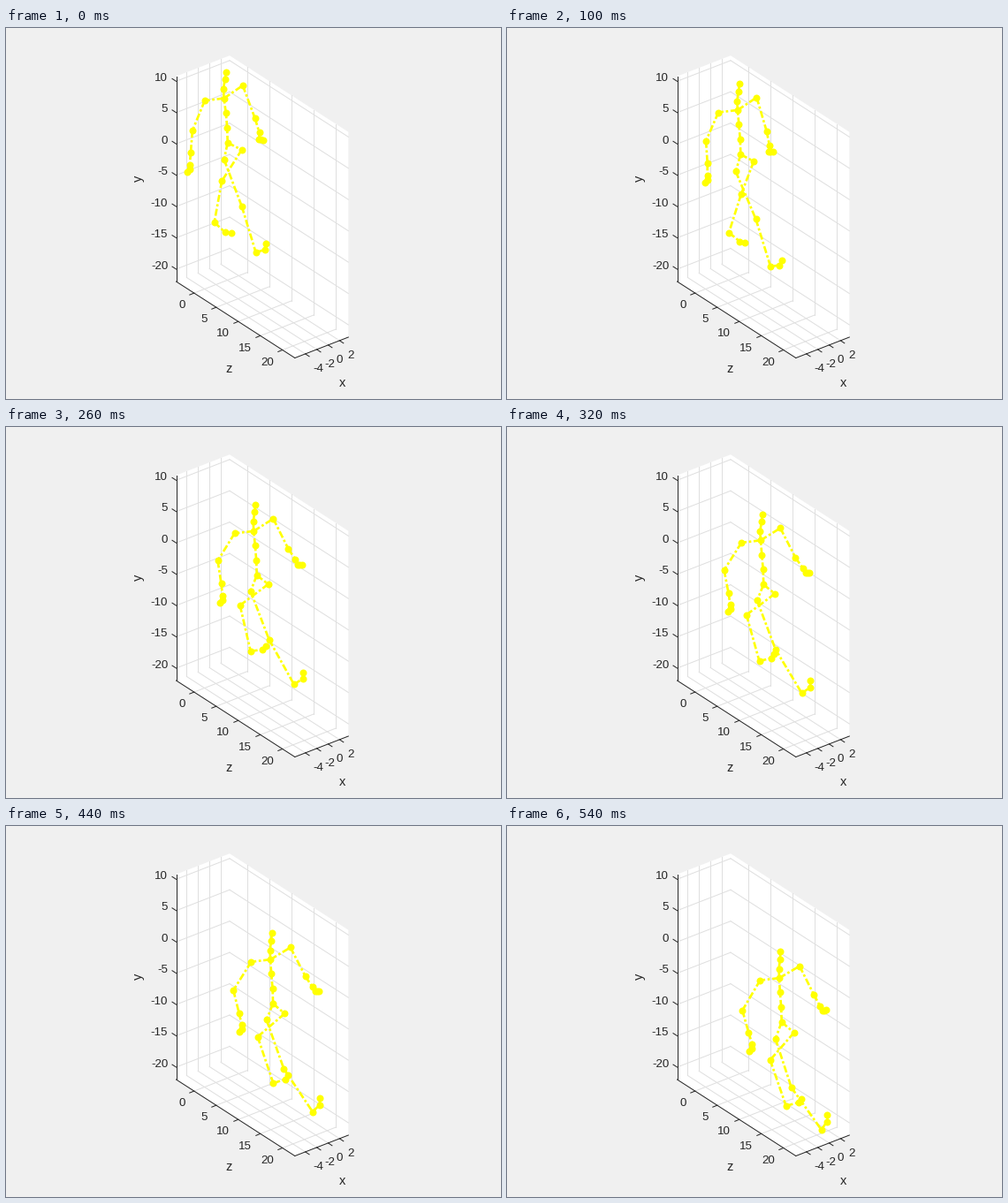
A matplotlib script that plays this animation: 560 px wide and 420 px high, repeating every 0.56 s.

```python
import numpy as np
import matplotlib.pyplot as plt
from matplotlib.animation import FuncAnimation
from matplotlib.collections import LineCollection

W, H, DPI = 560, 420, 100
PX = 72 / DPI                       # points per pixel
STEP, FRAMES = 20, 28
MID, END = 260, 540                 # ms
INK, YELLOW, BACK = "#262626", "#ffff00", "#f0f0f0"


def path(t, start, mid=None, end=None):
    """Hold, straight drift or parabola, for one, two or three key points."""
    start = np.array(start, float)
    if mid is None:
        return start
    if end is None:
        return start + (np.array(mid) - start) * t / END
    return (start * (t - MID) * (t - END) / (MID * END)
            + np.array(mid) * t * (END - t) / (MID * (END - MID))
            + np.array(end) * t * (t - MID) / (END * (END - MID)))


def stride(t):
    """Short push-off pulse shared by all swinging limbs."""
    return np.exp(-((t - 110) / 60) ** 2)


ROOT = [(250.2, 129.4), (283.2, 167.4), (310.2, 221.4)]

# Joint: parent, key vectors from the parent, extra reach at push-off.
BONES = {
    "belly": ("root", [(-0.5, -17)], (0, 0)),
    "ribs": ("belly", [(-1.4, -16.8)], (0, 0)),
    "chest": ("ribs", [(-2.3, -16.5), (-0.8, -16)], (0.5, 0)),
    "neck": ("chest", [(-0.5, -10.4)], (0, 0)),
    "jaw": ("neck", [(1.5, -11)], (0, 0)),
    "head": ("jaw", [(1.6, -8.2), (0.4, -8.5)], (0, 0)),

    "shoulder1": ("chest", [(-21.7, 2.6)], (0, 0)),
    "elbow1": ("shoulder1", [(-14, 34), (-19, 31), (-20, 34)], (2.4, 0)),
    "wrist1": ("elbow1", [(-2, 25), (4, 26), (7, 25)], (1, 0)),
    "hand1": ("wrist1", [(-1, 13.5), (4, 13)], (0, 0)),
    "finger1": ("hand1", [(-3, 8)], (0, 0)),
    "thumb1": ("hand1", [(0, 5)], (0, 0)),

    "shoulder2": ("chest", [(21.3, -14.5), (23, -13.5)], (0, 0)),
    "elbow2": ("shoulder2", [(14, 37), (17, 34), (16, 32)], (-4.5, 2.5)),
    "wrist2": ("elbow2", [(5, 16), (8, 12), (7, 13)], (-3.5, 2)),
    "hand2": ("wrist2", [(0, 8), (3, 6), (3, 5)], (-2.5, 0)),
    "finger2": ("hand2", [(5, 1), (4, -1)], (0, 0)),
    "thumb2": ("hand2", [(2, 0)], (0, 0)),

    "hip2": ("root", [(16, 8), (13, 10), (14, 12)], (0.5, -1)),
    "knee2": ("hip2", [(-23, 35), (-32, 24), (-27, 31)], (14, 9)),
    "ankle2": ("knee2", [(-8, 47), (12, 52), (18, 52)], (-15.5, -6.5)),
    "foot2": ("ankle2", [(12, 11), (13, -2), (14, -4)], (0, 5.5)),
    "toe2": ("foot2", [(7, 1), (4, -4), (3, -4)], (0, 2.5)),

    "hip1": ("root", [(-4, 19), (-7, 18), (-7, 19)], (0, 1)),
    "knee1": ("hip1", [(20, 53), (21, 55), (18, 55)], (2, 0)),
    "ankle1": ("knee1", [(16, 52), (28, 50.3), (34, 48)], (-5, 2)),
    "foot1": ("ankle1", [(10, -3), (10, -6), (6, -9)], (0, 3)),
    "toe1": ("foot1", [(1, -7), (0, -8)], (2, 1.5)),
}


def pose(t):
    joints = {"root": path(t, *ROOT)}
    for name, (parent, keys, reach) in BONES.items():
        joints[name] = joints[parent] + path(t, *keys) + np.array(reach) * stride(t)
    return joints


fig = plt.figure(figsize=(W / DPI, H / DPI), dpi=DPI, facecolor=BACK)
ax = fig.add_axes([0, 0, 1, 1])
ax.set_xlim(-0.5, W - 0.5)
ax.set_ylim(H - 0.5, -0.5)
ax.axis("off")

# Projected box: near left bottom corner and its three edges.
ORIGIN = np.array([192, 286.5])
ZDIR = np.array([134.3, 86.5])
XDIR = np.array([60.5, -23.5])
UP = np.array([0, -232.3])


def stroke(color, *points):
    for a, b in zip(points, points[1:]):
        ax.plot(*np.transpose([a, b]), color=color, lw=PX,
                solid_capstyle="projecting")


def label(x, y, text, size=13.33, **kw):
    kw = {"ha": "center", "va": "baseline", **kw}
    ax.text(x, y, text, color=INK, family="Liberation Sans",
            fontsize=size * PX, **kw)


def grid(*points):
    stroke("#dfdfdf", *points)


def tick(p, dx, dy):
    stroke(INK, p, p + (dx, dy))


hull = [ORIGIN, ORIGIN + UP, ORIGIN + UP + XDIR, ORIGIN + UP + XDIR + ZDIR,
        ORIGIN + XDIR + ZDIR, ORIGIN + ZDIR]
ax.fill(*np.transpose(hull), color="white", lw=0)

y_ticks = [(v, ORIGIN - (0, 14 + 7.09 * (v + 20))) for v in range(-20, 11, 5)]
z_ticks = [(v, ORIGIN + ZDIR * (20.3 + 5 * v) / ZDIR[0]) for v in range(0, 21, 5)]
x_ticks = [(v, ORIGIN + ZDIR + XDIR * (11.8 + 6.45 * (v + 4)) / XDIR[0])
           for v in range(-4, 3, 2)]

for _, p in y_ticks:
    grid(p, p + XDIR, p + XDIR + ZDIR)
for _, p in z_ticks:
    grid(p, p + XDIR, p + XDIR + UP)
for _, p in x_ticks:
    grid(p, p - ZDIR, p - ZDIR + UP)

stroke(INK, ORIGIN + UP, ORIGIN, ORIGIN + ZDIR, ORIGIN + ZDIR + XDIR)
for v, p in y_ticks:
    tick(p, -4.5, -2.9)
    label(182.7, p[1] - 0.4, str(v), ha="right")
for v, p in z_ticks:
    tick(p, -5, 2)
    label(p[0] - 10, p[1] + 17.2, str(v), ha="right")
for v, p in x_ticks:
    tick(p, 4.5, 2.9)
    label(p[0] + 8.8, p[1] + 20, str(v), ha="left")

label(149.5, 169.5, "y", 14.67, rotation=90, va="center")
label(252, 389.5, "z", 14.67)
label(379.7, 405.5, "x", 14.67)

limbs = LineCollection([], colors=YELLOW, linewidths=2.67 * PX,
                       linestyles=[(0, (3, 1, 1, 1))], capstyle="butt", zorder=5)
ax.add_collection(limbs, autolim=False)
dots, = ax.plot([], [], "o", color=YELLOW, ms=8 * PX, mew=0, snap=False, zorder=6)


def draw(frame):
    joints = pose(frame * STEP)
    limbs.set_segments([[joints[bone[0]], joints[name]]
                        for name, bone in BONES.items()])
    dots.set_data(*np.transpose(list(joints.values())))
    return limbs, dots


anim = FuncAnimation(fig, draw, frames=FRAMES, interval=STEP,
                     repeat=True, repeat_delay=0)
plt.show()
```
